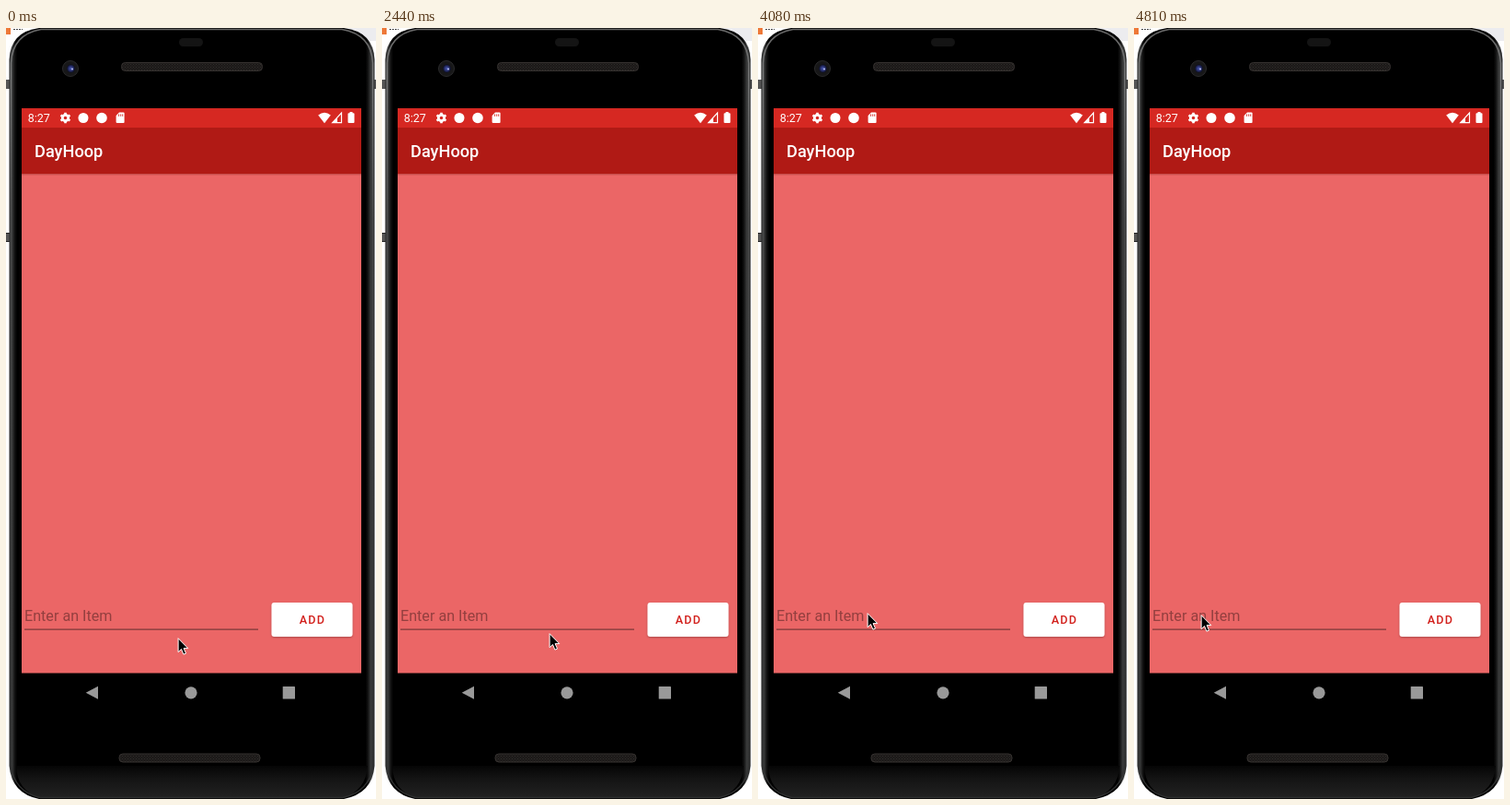
Animation, 402 px wide and 836 px high, one loop 8 s. Source, as an HTML page:

```html
<!DOCTYPE html>
<html lang="en">
<head>
<meta charset="utf-8">
<title>DayHoop</title>
<style>
  html, body { margin: 0; width: 100%; height: 100%; overflow: hidden; background: #fff; }
  svg { display: block; width: 402px; height: 836px; }
  text { font-family: Roboto, "Liberation Sans", sans-serif; }
</style>
</head>
<body>
<svg viewBox="0 0 402 836">
  <defs>
    <linearGradient id="rim" x1="0" x2="402" gradientUnits="userSpaceOnUse">
      <stop offset=".008" stop-color="#2c2d2d"/>
      <stop offset=".016" stop-color="#3a3b3b"/>
      <stop offset=".024" stop-color="#111"/>
      <stop offset=".03" stop-color="#000"/>
      <stop offset=".972" stop-color="#000"/>
      <stop offset=".978" stop-color="#111"/>
      <stop offset=".986" stop-color="#3a3b3b"/>
      <stop offset=".996" stop-color="#2c2d2d"/>
    </linearGradient>
    <linearGradient id="shine" x1="0" y1="0" x2="0" y2="836" gradientUnits="userSpaceOnUse">
      <stop offset="0" stop-color="#666"/>
      <stop offset=".06" stop-color="#7a7b7b"/>
      <stop offset=".25" stop-color="#484949"/>
      <stop offset="1" stop-color="#2e2f2f"/>
    </linearGradient>
    <linearGradient id="chin" x2="0" y2="1">
      <stop offset="0" stop-color="#050505"/>
      <stop offset=".4" stop-color="#141414"/>
      <stop offset="1" stop-color="#222"/>
    </linearGradient>
    <radialGradient id="lens">
      <stop offset="0" stop-color="#4a5bb8"/>
      <stop offset=".6" stop-color="#252c66"/>
      <stop offset="1" stop-color="#0b0d1c"/>
    </radialGradient>
    <pattern id="mesh" width="3" height="3" patternUnits="userSpaceOnUse">
      <rect width="3" height="3" fill="#1b1918"/>
      <path d="M0 0h1v1h-1zM1.5 1.5h1v1h-1z" fill="#302d2b"/>
    </pattern>
    <filter id="lift" x="-10%" y="-20%" width="120%" height="150%">
      <feDropShadow dx="0" dy="1" stdDeviation=".9" flood-color="#000" flood-opacity=".28"/>
    </filter>
  </defs>

  <!-- desktop behind the phone -->
  <path d="M0 0h5v7H0z" fill="#ee7838"/>
  <path d="M8 1.5h10" stroke="#444" stroke-dasharray="2 1"/>
  <path d="M370 0h32v14h-32z" fill="#ececef"/>

  <!-- phone body -->
  <path d="M0 56h6v10H0zM397 56h5v10h-5z" fill="#555"/>
  <path d="M0 222h6v10H0z" fill="#555"/>
  <path d="M0 222.5h6M0 231.5h6" stroke="#222"/>
  <path d="M3.5 34Q5 4 36 0H367Q399 4 400.5 34V800Q398 830 367 836H36Q6 830 3.5 800Z" fill="url(#rim)"/>
  <path d="M11 800H393Q391 827 366 835H37Q12 827 11 800Z" fill="url(#chin)"/>
  <path d="M5.5 800V38Q7 7 38 1.5H365Q397 7 398.5 38V800Q395 828 366 834.5H37Q9 828 5.5 800Z" fill="none" stroke="url(#shine)" stroke-width="1.5"/>

  <rect x="188" y="11" width="26" height="9" rx="4.5" fill="#141414"/>
  <circle cx="70" cy="44" r="8.5" fill="#171718" stroke="#2b2b2c"/>
  <circle cx="70.5" cy="44" r="4.5" fill="url(#lens)"/>
  <circle cx="72" cy="44.5" r="1.1" fill="#b4bdf0"/>
  <g fill="url(#mesh)" stroke="#35312f">
    <rect x="125.5" y="37.5" width="153" height="9" rx="4"/>
    <rect x="123" y="787" width="153" height="9" rx="4"/>
  </g>

  <!-- app -->
  <path d="M17 87h369v612.5H17z" fill="#eb6666"/>
  <path d="M17 87h369v21H17z" fill="#d62822"/>
  <path d="M17 108h369v50H17z" fill="#b01a15"/>
  <path d="M17 158h369v1H17z" fill="#c94f4d"/>
  <path d="M17 159h369v1H17z" fill="#de5d5c"/>

  <!-- status bar -->
  <g fill="#fff">
    <text x="23.7" y="102" font-size="12.5">8:27</text>
    <circle cx="64.5" cy="97.5" r="3.2" fill="none" stroke="#fff" stroke-width="2.8"/>
    <g id="gear"></g>
    <circle cx="84" cy="97.5" r="5.5"/>
    <circle cx="104" cy="97.5" r="5.8"/>
    <path d="M123 91.5h4.6q1 0 1 1v9.6q0 1-1 1h-7q-1 0-1-1V95z"/>
    <path d="M346 103.2 339.2 94.5Q346 88.8 352.8 94.5Z"/>
    <path d="M364.5 92v10.6h-9.8z" fill="none" stroke="#fff" stroke-width="1.2"/>
    <path d="M360 97v6h-6z"/>
    <path d="M373.5 91h3v1.2h1.1q.9 0 .9.9v9q0 .9-.9.9h-5.2q-.9 0-.9-.9v-9q0-.9.9-.9h1.1z"/>
  </g>
  <path d="M122.6 93.4v2.4M124.7 93.4v2.4M126.7 93.4v2.4" stroke="#d62822" stroke-width=".9"/>

  <text x="31" y="140" font-size="18.2" font-weight="500" fill="#fff">DayHoop</text>

  <!-- entry row -->
  <text x="20" y="642.7" font-size="16.15" fill="#933f3f">Enter an Item</text>
  <path d="M20 651.6h254v1.2H20z" fill="#7d3838"/>
  <rect x="288.5" y="623" width="88" height="37" rx="3" fill="#fff" filter="url(#lift)"/>
  <text x="318.8" y="646.3" font-size="12.6" font-weight="500" letter-spacing="1.12" fill="#d2211d">ADD</text>

  <!-- navigation -->
  <g fill="#999">
    <path d="M86.7 720.8 100 713.8V727.8Z"/>
    <circle cx="201" cy="720.8" r="6.6"/>
    <rect x="300.7" y="714" width="13.3" height="13.5" rx=".6"/>
  </g>

  <g id="pointer">
    <path d="M1.1 .7V15.7L4.5 12.5 6.9 18.2 9.5 17.1 7.1 11.6H11.8Z" fill="#000" stroke="#fff"/>
  </g>
</svg>
<script>
  const LOOP = 8000;

  const teeth = [];
  for (let a = 0; a < 360; a += 60) {
    teeth.push(`<path d="M63.2 91.7h2.6v2.6h-2.6z" transform="rotate(${a} 64.5 97.5)"/>`);
  }
  document.getElementById("gear").innerHTML = teeth.join("");

  // time, x, y: the pointer jumps and holds
  const steps = [
    [0, 186, 661], [510, 186, 660], [650, 186, 657], [800, 185, 657],
    [950, 184, 657], [1100, 183, 656], [2440, 181, 656], [2590, 168, 651],
    [2740, 129, 633], [3180, 128, 633], [4080, 118, 634], [4230, 111, 634],
    [4370, 97, 634], [4520, 83, 634], [4670, 75, 635], [4810, 72, 636],
    [LOOP, 72, 636]
  ];
  document.getElementById("pointer").animate(
    steps.map(([t, x, y]) => ({
      offset: t / LOOP,
      transform: `translate(${x}px, ${y}px)`,
      easing: "steps(1, end)"
    })),
    { duration: LOOP, iterations: Infinity }
  );
</script>
</body>
</html>
```
